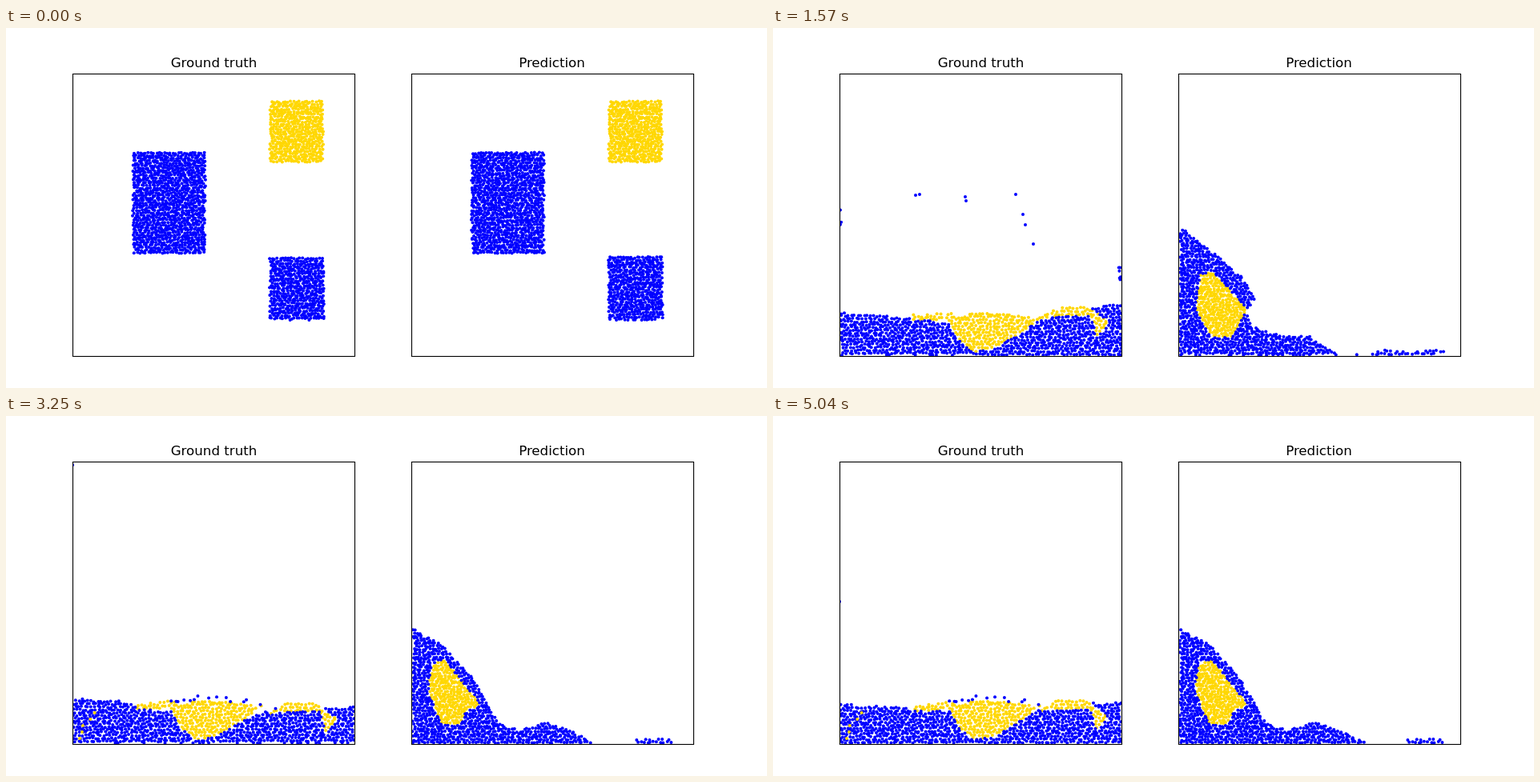
Recreate the animation shown at these times as an HTML page with a canvas. Size 950x450 px, loop 5070 ms.

```html
<!DOCTYPE html>
<html lang="en">
<head>
<meta charset="utf-8">
<title>Ground truth and prediction</title>
<style>
  html, body { margin: 0; width: 100%; height: 100%; overflow: hidden; background: #fff; }
  canvas, svg { position: absolute; left: 0; top: 0; display: block; }
  rect { fill: none; stroke: #000; stroke-width: 1.1; }
  text { font: 16.67px "DejaVu Sans", sans-serif; text-anchor: middle; }
</style>
</head>
<body>
<canvas id="stage" width="950" height="450"></canvas>
<svg width="950" height="450" viewBox="0 0 950 450">
  <rect x="83.5" y="57.5" width="352" height="353"/>
  <rect x="506.5" y="57.5" width="352" height="353"/>
  <text x="259.5" y="49">Ground truth</text>
  <text x="681.5" y="49">Prediction</text>
</svg>
<script>
const LOOP = 5070, STEP = 36, LAST = 140;
const BLUE = '#0000ff', GOLD = '#ffd700';
const TIGHT = 3.45, RADIUS = 2, L = 84, R = 435, TOP = 58, LOW = 410;
const ctx = document.getElementById('stage').getContext('2d');

const mix = (a, b, u) => a + (b - a) * u;
const clamp = (v, lo, hi) => Math.min(hi, Math.max(lo, v));
const noise = (i, j, k) => {
  const v = Math.sin(i * 127.1 + j * 311.7 + k * 74.7) * 43758.5453;
  return v - Math.floor(v);
};

// Eight points clockwise round a box, beginning at the given corner.
function box(x, y, w, h, corner = 0) {
  const pts = [];
  for (let i = 0; i < 8; i++) {
    const u = (i / 2 + corner) % 4, side = Math.floor(u), t = u % 1;
    pts.push(x + w * [t, 1, 1 - t, 0][side], y + h * [0, t, 1, 1 - t][side]);
  }
  return pts;
}
const warp = (pts, fx, fy) => pts.map((v, i) => i % 2 ? fy(v) : fx(v));
const shift = (pts, dx, dy = 0) => warp(pts, x => x + dx, y => y + dy);

// A body of particles: each key is [step, outline].
function body(color, gap, loosen, ...keys) {
  const size = Math.max(...keys.map(k => k[1].length));
  const shapes = keys.map(([, outline]) => {
    const pts = [...outline];
    while (pts.length < size) pts.push(...pts.slice(-2));
    return pts;
  });
  return { color, gap, loosen, shapes, times: keys.map(k => k[0]) };
}

// Monotone cubic through the keys, one coordinate at a time.
function shapeAt({ times, shapes }, f) {
  const end = times.length - 1;
  if (f < times[0] || f > times[end]) return null;
  let k = 0;
  while (k < end - 1 && f >= times[k + 1]) k++;
  const span = times[k + 1] - times[k], u = (f - times[k]) / span, v = 1 - u;
  const slope = (s, c) => (shapes[s + 1][c] - shapes[s][c]) / (times[s + 1] - times[s]);
  const tangent = (s, c) => {
    if (s === 0) return slope(0, c);
    if (s === end) return slope(end - 1, c);
    const a = slope(s - 1, c), b = slope(s, c);
    return a * b > 0 ? 2 * a * b / (a + b) : 0;
  };
  return shapes[k].map((a, c) =>
    a * (1 + 2 * u) * v * v + shapes[k + 1][c] * u * u * (3 - 2 * u)
      + span * (tangent(k, c) * u * v * v - tangent(k + 1, c) * u * u * v));
}

function inside(p, x, y) {
  let hit = false;
  for (let i = 0, j = p.length - 2; i < p.length; j = i, i += 2) {
    if ((p[i + 1] > y) !== (p[j + 1] > y) &&
        x < (p[j] - p[i]) * (y - p[i + 1]) / (p[j + 1] - p[i + 1]) + p[i]) hit = !hit;
  }
  return hit;
}

function dot(color, x, y) {
  ctx.fillStyle = color;
  ctx.beginPath();
  ctx.arc(x, y, RADIUS, 0, 7);
  ctx.fill();
}

// Jittered lattice carried by the middle of the shape; earlier bodies keep their ground.
function fill(b, p, taken, f, seed) {
  const xs = p.filter((_, i) => i % 2 === 0), ys = p.filter((_, i) => i % 2);
  const mean = a => a.reduce((s, v) => s + v, 0) / a.length;
  const cx = mean(xs), cy = mean(ys);
  const s = mix(TIGHT, b.gap, clamp((f - b.loosen) / 6, 0, 1)), row = s * 0.9;
  const i0 = Math.floor((Math.min(...xs) - cx) / s) - 1, i1 = (Math.max(...xs) - cx) / s + 1;
  const j0 = Math.floor((Math.min(...ys) - cy) / row) - 1, j1 = (Math.max(...ys) - cy) / row + 1;
  for (let j = j0; j <= j1; j++) {
    for (let i = i0; i <= i1; i++) {
      const x = cx + s * (i + (j & 1) / 2 + 0.62 * (noise(i, j, seed) - 0.5));
      const y = cy + row * (j + 0.66 * (noise(i, j, seed + 9) - 0.5));
      if (y < LOW - 1 && inside(p, x, y) && !taken.some(q => inside(q, x, y))) dot(b.color, x, y);
    }
  }
}

// The settled pool rocks: step, drift of the lens, level at the left and right wall.
const slosh = [[45, -10, 359, 346], [62, 0, 366, 342], [90, -26, 353, 363], [111, -40, 345, 368], [140, -12, 360, 357]];
const rock = shape => slosh.map(([f, dx, l, r]) => [f, shape(dx, l, r)]);

const lensShape = [228,361, 270,355, 345,362, 318,383, 290,400, 262,405, 243,388];
const rimShape = [335,360, 360,346, 395,346, 424,368, 408,384, 400,357, 370,357];
const tailShape = [185,364, 237,358, 237,367, 190,371];
const hookShape = [346,300, 367,334, 424,318, 411,330, 368,341, 352,320];

const lens = body(GOLD, 4.2, 14,
  [0, box(329, 91, 67, 77)],
  [9, box(254, 158, 67, 77)],
  [18, box(180, 328, 78, 73)],
  [28, [178,350, 215,351, 300,378, 285,384, 255,397, 205,403, 188,390]],
  ...rock(dx => shift(lensShape, dx)));
const rim = body(GOLD, 4.4, 0,
  [20, [290,385, 340,384, 390,382, 390,386, 340,388]],
  [28, [290,373, 405,368, 420,322, 427,335, 424,364, 405,376, 330,378]],
  ...rock((dx, l, r) => shift(rimShape, dx / 3, (r - 342) * 0.6)));
const tail = body(GOLD, 4.4, 0,
  [20, [140,288, 172,326, 172,332, 150,300]],
  [28, [104,273, 178,346, 172,348, 120,289]],
  ...rock((dx, l) => shift(tailShape, dx, (l - 366) / 4)));
const left = body(BLUE, 3.95, 3,
  [0, box(158, 155, 91, 127)],
  [5, box(86, 207, 91, 127)],
  [9, [L,128, 96,208, 138,245, 155,300, 150,350, 115,LOW, L,LOW, L,270]],
  [18, [L,225, 125,275, 165,325, 195,395, 235,LOW, L,LOW, L,395, 95,345]],
  [28, [96,268, 148,310, 176,345, 200,403, 250,LOW, L,LOW, L,390, 141,348, 124,306]],
  ...rock((dx, l) => [L,l, 140,l + 3, 210 + dx,367, 236 + dx,370, 260 + dx,LOW, L,LOW]));
const right = body(BLUE, 3.95, 2,
  [0, box(329, 286, 68, 79, 3)],
  [3, box(365, 330, 68, 79, 3)],
  [9, [240,406, 345,400, 400,375, 424,335, 434,120, R,LOW, 240,LOW]],
  [28, [250,400, 310,377, 400,375, 424,360, R,292, R,LOW, 250,LOW]],
  ...rock((dx, l, r) => [250 + dx,400, 318 + dx,382, 347 + dx / 3,(r + 366) / 2, 395,r + 2, R,r, R,LOW, 250 + dx,LOW]));
const hook = body(BLUE, 3.9, 0,
  [18, shift(hookShape, 10, 16)],
  [28, hookShape],
  [42, warp(hookShape, x => x - 15, y => 300 + y / 5)]);

// Prediction: a heap at the left wall, its toe creeping to the right.
const toe = (pts, d) => warp(pts, x => x + d * Math.max(0, x - 650) / 80, y => y);
const core = [531,310, 547,304, 592,360, 574,370, 568,386, 545,386, 527,345];
const heapShape = [508,266, 545,286, 580,324, 604,364, 615,384, 642,392, 672,383, 700,393, 730,LOW, 507,LOW];

const yolk = body(GOLD, 3.6, 14,
  [0, box(752, 91, 67, 77)],
  [9, box(669, 160, 66, 70)],
  [18, box(588, 266, 64, 70)],
  [28, [536,308, 553,303, 594,337, 590,375, 580,388, 555,386, 532,358]],
  [62, core], [LAST, core]);
const heap = body(BLUE, 3.7, 4,
  [0, box(581, 155, 91, 127)],
  [5, box(519, 200, 91, 127)],
  [9, [508,167, 553,218, 583,305, 582,345, 586,377, 540,357, 521,LOW, 507,LOW]],
  [28, [508,205, 555,262, 595,291, 595,301, 555,303, 532,345, 545,382, 595,374, 640,LOW, 507,LOW]],
  [54, heapShape], [LAST, toe(heapShape, 13)]);
const wing = body(BLUE, 4.1, 3,
  [0, box(752, 286, 68, 79, 3)],
  [9, [687,335, 740,308, 815,275, 840,245, 857,222, 857,264, 803,305, 798,342, 725,352, 688,380]],
  [28, [600,404, 688,408, 735,395, 790,408, 858,389, 858,LOW, 600,LOW]],
  [54, box(781, 404, 46, 6, 3)], [LAST, box(790, 404, 48, 6, 3)]);

// Loose drops fly freely between the walls, passing their places at the base step.
const run = (x, y, h, n) =>
  Array.from({ length: n * 2 }, (_, i) => i % 2 ? y + h * noise(i, y, 3) : x + 3 * noise(i, y, 4) - 1.5);
const sprays = [
  { base: 9, span: 9, vx: -2, vy: -6, at: [390,58, 410,58, 135,404, 172,407, 199,408, 210,408] },
  { base: 9, span: 9, vx: 0, vy: -6, at: [...run(433, 62, 45, 6), ...run(432, 128, 26, 5), ...run(432, 190, 80, 14), ...run(85, 130, 55, 5)] },
  { base: 28, span: 16, vx: 0, vy: 2, at: [...run(85, 60, 65, 3), ...run(85, 170, 60, 4), ...run(433, 126, 28, 6), ...run(433, 240, 6, 3), ...run(91, 250, 24, 10), ...run(86, 285, 95, 8)] },
  { base: 28, span: 16, vx: -3, vy: 1, at: [223,59, 228,58, 285,61, 286,66, 348,58, 357,83, 360,96, 370,120, 333,312, 335,338, 326,365] },
  { base: 28, span: 14, vx: 1, vy: 2, color: GOLD, at: [103,243, 88,333, 91,378] },
  { base: 62, span: 13, vx: -1, vy: 16, at: [184,225] }
];

function drawSprays(f) {
  for (const { base, span, vx, vy, color = BLUE, at } of sprays) {
    const d = f - base;
    if (Math.abs(d) > span || (base === 9 && d < -2)) continue;
    for (let i = 0; i < at.length; i += 2) {
      const y = Math.max(TOP, at[i + 1] + vy * d + 0.6 * d * d);
      if (y < LOW - 1) dot(color, clamp(at[i] + vx * d, L, R - 1), y);
    }
  }
}

// Blue drops riding on the gold lens, gold specks by the left wall, one drop on the wall.
function drawTrim(f, p) {
  if (f < 45) return;
  for (let i = 0; i < 14; i++) {
    const u = (i + noise(i, 3, 1)) / 7, k = Math.floor(u) * 2, t = u % 1;
    dot(BLUE, mix(p[k], p[k + 2], t), mix(p[k + 1], p[k + 3], t) - 1 - 5 * noise(i, 5, 2));
  }
  for (let i = 0; i < 5; i++) dot(GOLD, 92 + 8 * i * noise(i, 2, 6), 403 - 8 * i);
  const slip = Math.max(0, f - 111);
  dot(BLUE, 83, 59 + (f - 45) * 0.05 + 0.2 * slip * slip);
}

function drawPanel(x, bodies, f, extra) {
  ctx.save();
  ctx.beginPath();
  ctx.rect(x, 57.5, 352, 353);
  ctx.clip();
  const taken = [];
  bodies.forEach((b, i) => {
    const p = shapeAt(b, f);
    if (!p) return;
    fill(b, p, taken, f, i + 1);
    taken.push(p);
  });
  if (extra) extra(f, taken[0]);
  ctx.restore();
}

let shown = -1;
function tick() {
  const f = Math.min(LAST, Math.floor(performance.now() % LOOP / STEP));
  if (f !== shown) {
    shown = f;
    ctx.fillStyle = '#fff';
    ctx.fillRect(0, 0, 950, 450);
    drawPanel(83.5, [lens, rim, tail, left, right, hook], f, (step, outline) => {
      drawSprays(step);
      drawTrim(step, outline);
    });
    drawPanel(506.5, [yolk, heap, wing], f);
  }
  requestAnimationFrame(tick);
}
tick();
</script>
</body>
</html>
```
